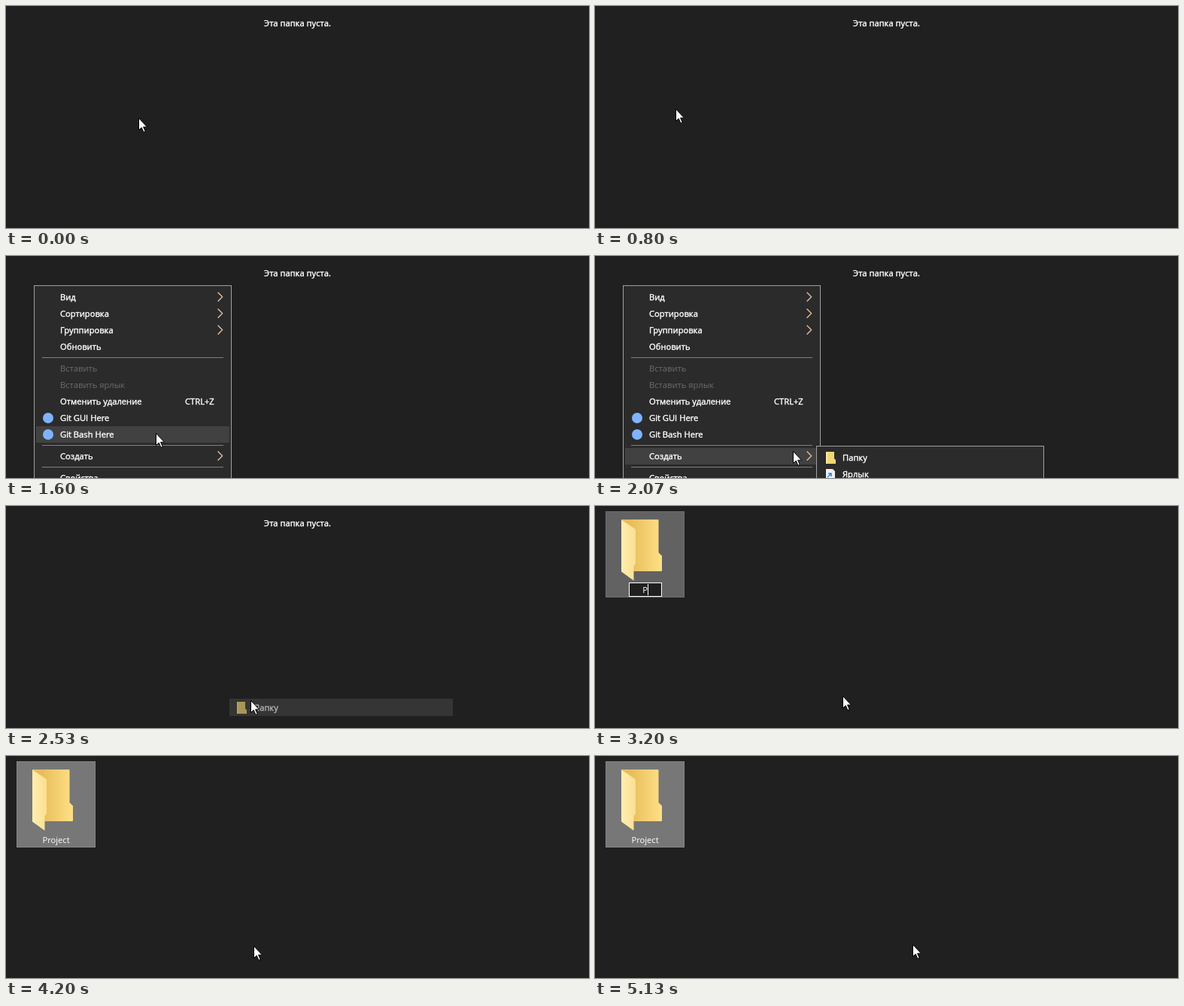
An HTML page that plays this animation: 775x296 px, repeating every 5.59 s.

```html
<!DOCTYPE html>
<html lang="ru">
<head>
<meta charset="utf-8">
<title>Новая папка</title>
<style>
  html, body { margin: 0; width: 100%; height: 100%; overflow: hidden; background: #202020; }
  svg { display: block; width: 775px; height: 296px; }
  text { font: 500 11.2px "Open Sans", "Noto Sans", sans-serif; fill: #fff; white-space: pre; }
  .bold { stroke: #fff; stroke-width: 0.4px; }
  .off { fill: #6d6d6d; }
  .mid { text-anchor: middle; }
  .panel { fill: #2b2b2b; stroke: #a0a0a0; }
  .hot { fill: #414141; }
  .line { stroke: #808080; }
</style>
</head>
<body>
<svg viewBox="0 0 775 296">
  <defs>
    <linearGradient id="back"><stop offset="0.25" stop-color="#e8be5c"/><stop offset="1" stop-color="#ffe086"/></linearGradient>
    <linearGradient id="flap"><stop offset="0" stop-color="#ffeeb0"/><stop offset="1" stop-color="#fbdf92"/></linearGradient>
    <g id="chevron" fill="none">
      <path d="M281 -5.5L287 .5L281 6.5" stroke="#3a4f9a"/>
      <path d="M281.7 -5.5L287.7 .5L281.7 6.5" stroke="#f6c79c" stroke-width="1.1"/>
    </g>
  </defs>

  <text id="empty" class="mid bold" x="387.5" y="27">Эта папка пуста.</text>

  <g id="folder">
    <rect id="tile" x="14.5" y="7.5" width="104" height="114"/>
    <path d="M35 18H83.5Q84.5 18 84.5 19V62L89 66.5V86Q89 87 88 87H50L35 80Z" fill="url(#back)"/>
    <path d="M35 18.5L52.5 30Q54 31 54 33V77L51.5 80V99.5L35 87.5Z" fill="url(#flap)"/>
    <rect id="field" y="102.5" height="18" fill="#202020" stroke="#fff"/>
    <rect id="mark" y="104" height="15" fill="#0078d7"/>
    <text id="label" class="mid" x="66.5" y="116"></text>
    <path id="caret" stroke="#fff"/>
  </g>

  <g id="menu"></g>
  <g id="sub">
    <g id="rest">
      <rect class="panel" x="294.5" y="253.5" width="302" height="60"/>
      <path d="M307 284h9l3 3v12h-12z" fill="#f0f0f0"/>
      <path d="M309 295l5-5m-4 0h4v4" fill="none" stroke="#2f7fd0" stroke-width="1.5"/>
      <text class="bold" x="329" y="295">Ярлык</text>
    </g>
    <rect id="subHot" class="hot" x="297" y="257" width="297" height="23"/>
    <path d="M307 261h11v9l2 2v5h-13z" fill="#f3d675"/>
    <path d="M307 261l2 1v15h-2z" fill="#ffe9a3"/>
    <text class="bold" x="329" y="273">Папку</text>
  </g>
  <path id="cursor" d="M.5 .5V16.5L4.2 13L7 19.3L9.3 18.3L6.6 12.2H11.5Z" fill="#fff" stroke="#000"/>
</svg>
<script>
const LOOP = 5590, TICK = 1000 / 15, ROW = 22, GAP = 7;
// moments, in ticks
const OPEN = 19, SUB = 27, PICK = 38, MADE = 42, TYPED = 47, DONE = 63;

const $ = id => document.getElementById(id);
const show = (id, on) => $(id).style.display = on ? '' : 'none';
const set = (id, attrs) => { for (const k in attrs) $(id).setAttribute(k, attrs[k]); };

// label and optional mark: > submenu, - disabled, o icon, anything else = shortcut
const groups = [
  [['Вид', '>'], ['Сортировка', '>'], ['Группировка', '>'], ['Обновить']],
  [['Вставить', '-'], ['Вставить ярлык', '-'], ['Отменить удаление', 'CTRL+Z'],
    ['Git GUI Here', 'o'], ['Git Bash Here', 'o']],
  [['Создать', '>']],
  [['Свойства']]
];

function extra(mark, y) {
  if (!mark || mark === '-') return '';
  if (mark === '>') return `<use href="#chevron" y="${y - 1}"/>`;
  if (mark === 'o') return `<circle cx="56" cy="${y}" r="7" fill="#80b3ff"/>`;
  return `<text class="bold" x="238" y="${y + 4}">${mark}</text>`;
}

const rowAt = {};
function buildMenu() {
  let y = 55, html = '';
  groups.forEach((group, i) => {
    if (i) {
      html += `<path class="line" d="M48 ${y - 7.5}H289"/>`;
      y += GAP;
    }
    for (const [name, mark] of group) {
      rowAt[name] = y;
      html += `<text x="72" y="${y + 4}" class="${mark === '-' ? 'off' : 'bold'}">${name}</text>` + extra(mark, y);
      y += ROW;
    }
  });
  $('menu').innerHTML =
    '<rect class="panel" x="37.5" y="39.5" width="262" height="270"/>' +
    `<rect id="hot" class="hot" x="40" width="257" height="${ROW}"/>` + html;
}
buildMenu();

const START = { x: 176, y: 149 };
const moves = [
  { from: 7, to: 17, x: 37, y: 39, sag: 43 },
  { from: 18.3, to: 24, x: 199, y: 236 },
  { from: 24, to: SUB, x: 200, y: 261 },
  { from: SUB, to: 35, x: 325, y: 259 },
  { from: PICK, to: 40, x: 329, y: 253 },
  { from: 71, to: 74, x: 485, y: 273 },
  { from: 74, to: 77, x: 422, y: 251 }
];
const ease = u => (1 - Math.cos(Math.PI * u)) / 2;

function pointer(k) {
  let { x, y } = START;
  for (const m of moves) {
    if (k <= m.from) break;
    const u = ease(Math.min(1, (k - m.from) / (m.to - m.from)));
    x += (m.x - x) * u;
    y += (m.y - y) * u + 4 * (m.sag || 0) * u * (1 - u);
  }
  return [Math.round(x), Math.round(y)];
}

// the name is typed in bursts, one letter per tick
const bursts = ['P', 'ro', 'jec', 't'], PAUSE = 4.34;
function nameAt(k) {
  if (k < TYPED) return 'Новая папка';
  return bursts.map((s, i) => s.slice(0, Math.max(0, k - TYPED - Math.floor(i * PAUSE) + 1))).join('');
}

function drawMenus(k, x, y) {
  show('menu', k >= OPEN && k < PICK);
  show('sub', k >= SUB && k < PICK + 3);
  show('rest', k < PICK);
  const row = k >= SUB ? rowAt['Создать'] : Object.values(rowAt).find(r => Math.abs(y - r) <= ROW / 2);
  show('hot', row && k > OPEN);
  if (row) set('hot', { y: row - ROW / 2 });
  show('subHot', x >= 297);
  set('sub', { opacity: k < PICK ? 1 : 0.65 - 0.25 * (k - PICK) });
}

function drawFolder(k) {
  const made = k >= MADE, editing = k < DONE;
  show('empty', !made);
  show('folder', made);
  if (!made) return;
  $('label').textContent = nameAt(k);
  const w = Math.round($('label').getComputedTextLength());
  const box = w + 36;
  set('tile', editing ? { fill: '#626262', stroke: '#6e6e6e' } : { fill: '#777', stroke: '#858585' });
  set('field', { x: Math.round(66 - box / 2) + 0.5, width: box });
  set('mark', { x: 66 - w / 2, width: w + 1 });
  set('caret', { d: `M${Math.round(66 + w / 2) + 0.5} 104V119` });
  show('field', editing);
  show('mark', k < TYPED);
  show('caret', editing && k >= TYPED);
}

let last = -1;
function frame() {
  const k = Math.floor((performance.now() % LOOP + 4) / TICK);
  if (k !== last) {
    last = k;
    const [x, y] = pointer(k);
    set('cursor', { transform: `translate(${x} ${y})` });
    drawMenus(k, x, y);
    drawFolder(k);
  }
  requestAnimationFrame(frame);
}
frame();
</script>
</body>
</html>
```
